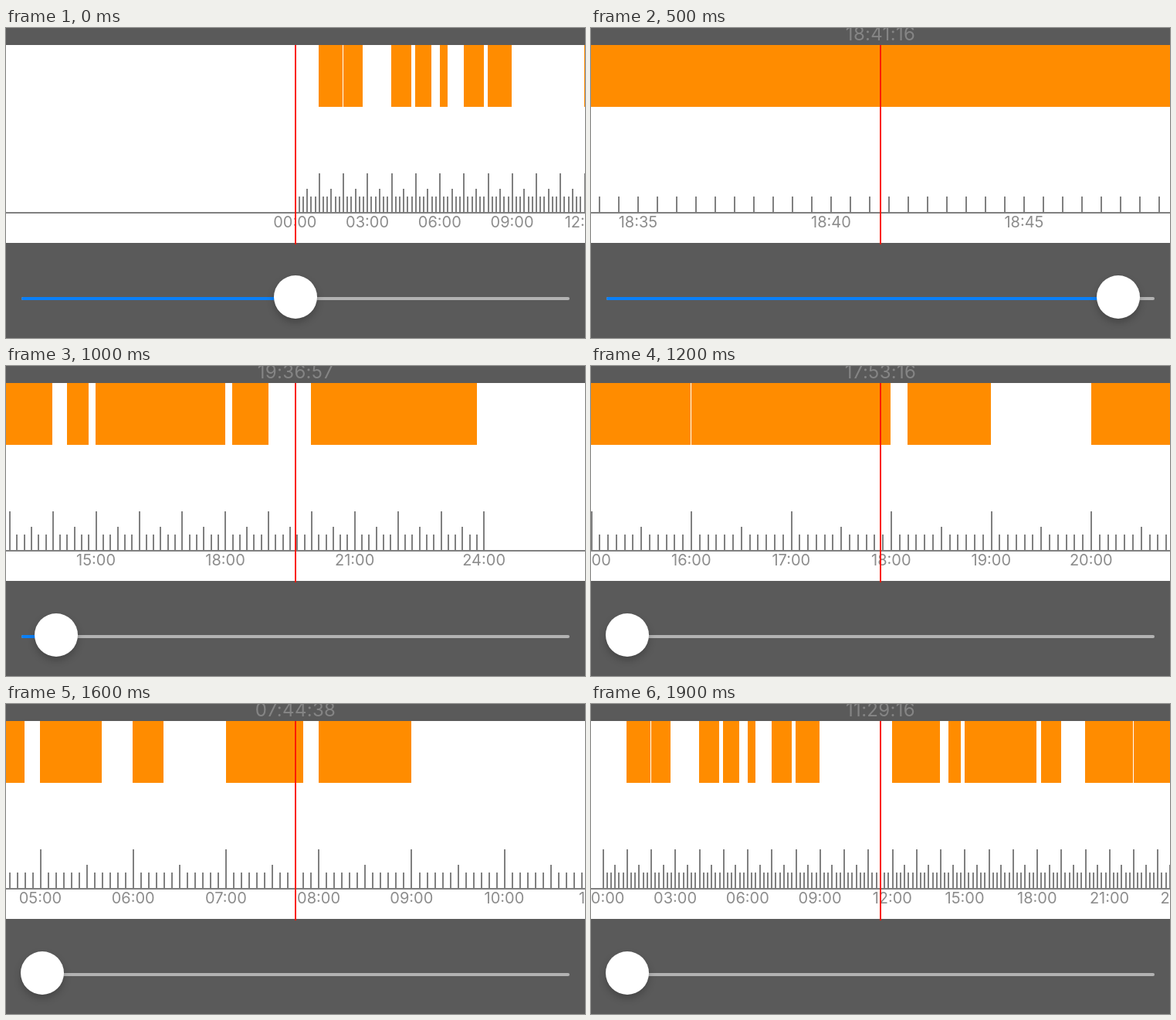
An HTML page for the animation above (2000 ms loop, 750x401 px).

```html
<!DOCTYPE html>
<html lang="en">
<head>
<meta charset="utf-8">
<title>Timeline scrubber</title>
<style>
  html, body { margin: 0; width: 100%; height: 100%; overflow: hidden; background: #5a5a5a; }
  svg { display: block; width: 100%; height: 100%; }
  text { font-family: Inter, Roboto, sans-serif; text-anchor: middle; }
  #clock { font-size: 24px; letter-spacing: .3px; fill: #858585; }
  #labels { font-size: 20px; fill: #8c8c8c; }
  #thumb { fill: #fff; filter: drop-shadow(0 5px 5px rgba(0, 0, 0, .22)); }
</style>
</head>
<body>
<svg viewBox="0 0 750 401">
  <rect width="750" height="401" fill="#5a5a5a"/>
  <text id="clock" x="375" y="16"></text>
  <rect y="22" width="750" height="256" fill="#fff"/>
  <path id="runs" fill="#ff8c00"/>
  <path id="pauses" fill="#fff"/>
  <path id="ticks" fill="#808080"/>
  <rect y="238" width="750" height="2" fill="#808080"/>
  <g id="labels"></g>
  <rect x="374" y="22" width="2" height="258" fill="#fb1c04"/>
  <rect x="20" y="348" width="710" height="4" rx="2" fill="#b2b2b2"/>
  <rect id="fill" x="20" y="348" height="4" rx="2" fill="#0a80f8"/>
  <circle id="thumb" cy="348" r="28"/>
</svg>
<script>
const $ = id => document.getElementById(id);
const LOOP = 2000, STEP = 100, MIN = 60, HOUR = 3600, DAY = 24 * HOUR, MID = 375;

// where each drag or pinch ends; zoom is the width of an hour
const poses = [
  { at: 0, clock: "00:00:00", zoom: 31.25, slider: .5 },
  { at: 200, clock: "16:07:40", zoom: 31.25, slider: .5 },
  { at: 500, clock: "18:41:16", zoom: 3000, slider: .97, hold: 100 },
  { at: 1000, clock: "19:36:57", zoom: 55.85, slider: .027 },
  { at: 1200, clock: "17:53:16", zoom: 129.5, slider: 0 },
  { at: 1600, clock: "07:44:38", zoom: 120.2, slider: 0 },
  { at: 1900, clock: "11:29:16", zoom: 31.25, slider: 0 }
];

const lerp = (a, b, p) => a + (b - a) * p;
const pad = n => String(Math.floor(n)).padStart(2, "0");
const hhmm = s => pad(s / HOUR) + ":" + pad(s / MIN % 60);
const seconds = text => text.split(":").reduce((sum, part) => sum * 60 + +part, 0);
const span = (hour, minutes) => [hour * HOUR, hour * HOUR + minutes * MIN];

// hourly recordings in the morning, two-hour ones with pauses from noon on
const runs = [
  ...[60, 50, 0, 50, 40, 20, 50, 60].map((len, i) => span(i + 1, len)),
  ...Array.from({ length: 6 }, (_, i) => span(12 + 2 * i, 120))
];
const pauses = [
  span(14, 20), span(14 + 5 / 6, 10), span(18, 10), span(19, 60), span(23 + 5 / 6, 10)
];

function stateAt(t) {
  const i = Math.max(1, poses.findIndex(pose => pose.at >= t));
  const a = poses[i - 1], b = poses[i];
  const start = a.at + (a.hold || 0);
  const p = Math.max(0, (t - start) / (b.at - start));
  return {
    centre: Math.round(lerp(seconds(a.clock), seconds(b.clock), p)),
    zoom: a.zoom * (b.zoom / a.zoom) ** p,
    thumb: Math.round(47 + 656 * lerp(a.slider, b.slider, p))
  };
}

// seconds between ticks and between labels
function units(zoom) {
  if (zoom >= 700) return [MIN / 2, 5 * MIN];
  if (zoom >= 100) return [5 * MIN, HOUR];
  return [10 * MIN, 3 * HOUR];
}

// multiples of a unit that are visible within the day
function marks(unit, centre, zoom) {
  const half = (MID + 40) / zoom * HOUR, list = [];
  const first = Math.max(0, Math.ceil((centre - half) / unit) * unit);
  const last = Math.min(DAY, centre + half);
  for (let s = first; s <= last; s += unit) list.push(s);
  return list;
}

function draw(t) {
  const { centre, zoom, thumb } = stateAt(t);
  const [tickUnit, labelUnit] = units(zoom);
  const pos = s => MID + (s - centre) / HOUR * zoom;

  // ends round slightly lower than starts, which leaves hairline seams
  const bars = list => list.map(([from, to]) =>
    `M${Math.round(pos(from) - 1)} 22V102H${Math.round(pos(to) - 1.1)}V22z`).join("");
  const bar = s => {
    const h = s % HOUR === 0 ? 50 : s % (HOUR / 2) === 0 ? 30 : 20;
    return `M${Math.floor(pos(s)) - 1} 238v${-h}h2v${h}z`;
  };
  const label = s => `<text x="${pos(s) - .7}" y="257.5">${hhmm(s)}</text>`;

  $("clock").textContent = t ? hhmm(centre) + ":" + pad(centre % 60) : "";
  $("runs").setAttribute("d", bars(runs));
  $("pauses").setAttribute("d", bars(pauses));
  $("ticks").setAttribute("d", marks(tickUnit, centre, zoom).map(bar).join(""));
  $("labels").innerHTML = marks(labelUnit, centre, zoom).map(label).join("");
  $("fill").setAttribute("width", thumb - 20);
  $("thumb").setAttribute("cx", thumb);
}

let shown = -1;
function tick(now) {
  const t = Math.floor(now % LOOP / STEP) * STEP;
  if (t !== shown) draw(shown = t);
  requestAnimationFrame(tick);
}
draw(0);
requestAnimationFrame(tick);
</script>
</body>
</html>
```
